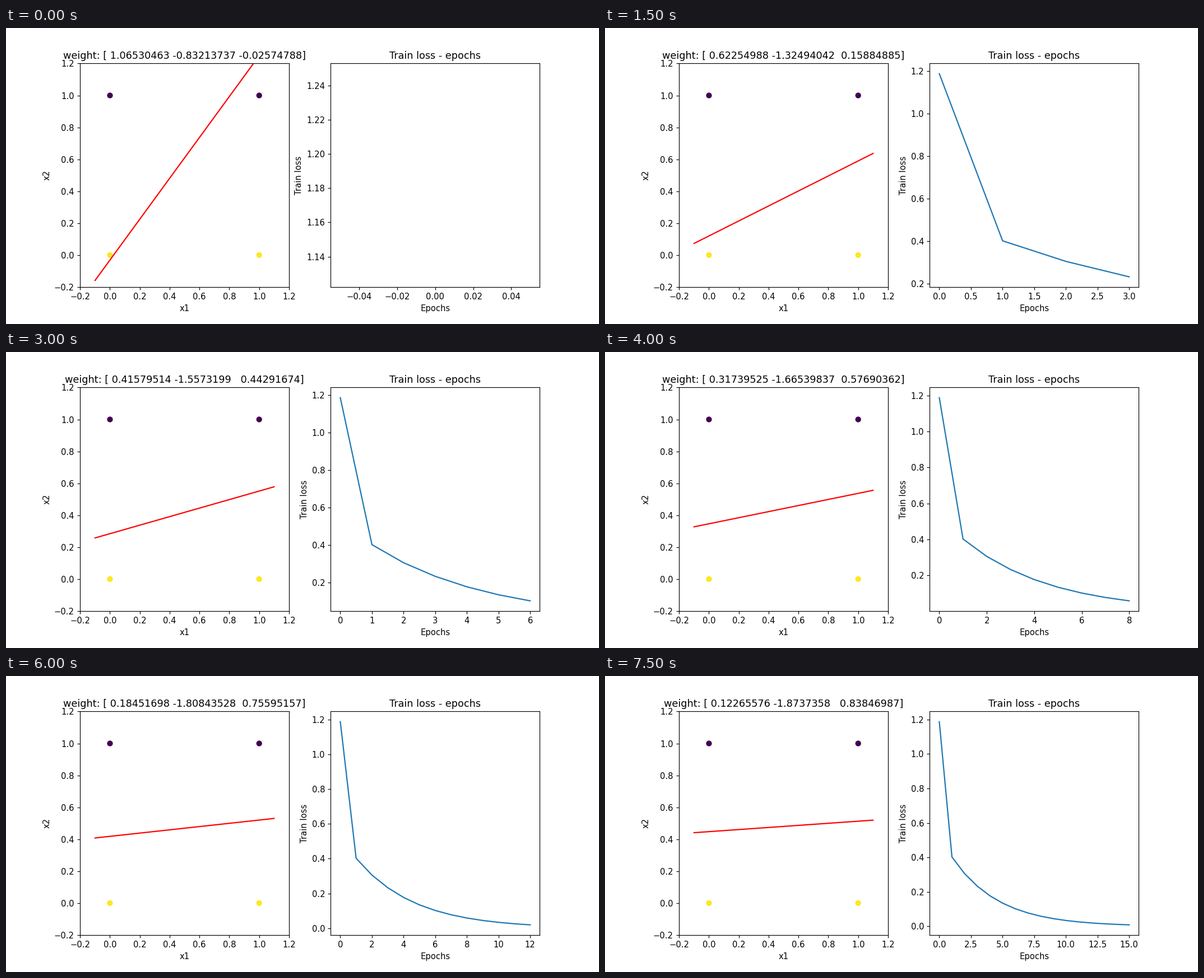
A matplotlib script for the animation above (8000 ms loop, 1058 by 529 pixels).

```python
import numpy as np
import matplotlib.pyplot as plt
from matplotlib.animation import FuncAnimation

EPOCHS = 16
RATE = 0.2

# Two mini-batches of (x1, x2, bias); the class depends on x2 only.
BATCHES = [np.array([[0, 1, 1], [1, 0, 1]], float),
           np.array([[0, 0, 1], [1, 1, 1]], float)]


def target(x):
    return 1 - 2 * x[:, 1]


def train():
    w = np.array([1.065304627, -0.832137373, -0.0257478775])
    weights, losses = [w], [1.18755]
    for _ in range(EPOCHS - 1):
        batch_loss = []
        for x in BATCHES:
            w = w - RATE * x.T @ (x @ w - target(x))
            batch_loss.append(np.mean((x @ w - target(x)) ** 2))
        weights.append(w)
        losses.append(np.mean(batch_loss))
    return weights, losses


weights, losses = train()
points = np.vstack(BATCHES)
span = np.array([-0.1, 1.1])

fig, (left, right) = plt.subplots(1, 2, figsize=(10, 5), dpi=105.8)
fig.subplots_adjust(left=0.125, right=0.9, bottom=0.125, top=0.88,
                    wspace=0.2)


def draw_boundary(w):
    left.clear()
    left.scatter(points[:, 0], points[:, 1], c=target(points))
    left.plot(span, -(w[0] * span + w[2]) / w[1], color="red")
    left.set(xlim=(-0.2, 1.2), ylim=(-0.2, 1.2), xlabel="x1", ylabel="x2",
             title=f"weight: {w}")


def draw_loss(history):
    right.clear()
    right.plot(history, color="tab:blue")
    right.set(xlabel="Epochs", ylabel="Train loss",
              title="Train loss - epochs")


def update(epoch):
    draw_boundary(weights[epoch])
    draw_loss(losses[:epoch + 1])
    return []


anim = FuncAnimation(fig, update, frames=EPOCHS, interval=500,
                     init_func=lambda: update(0), repeat=True,
                     repeat_delay=0, blit=False)
plt.show()
```
